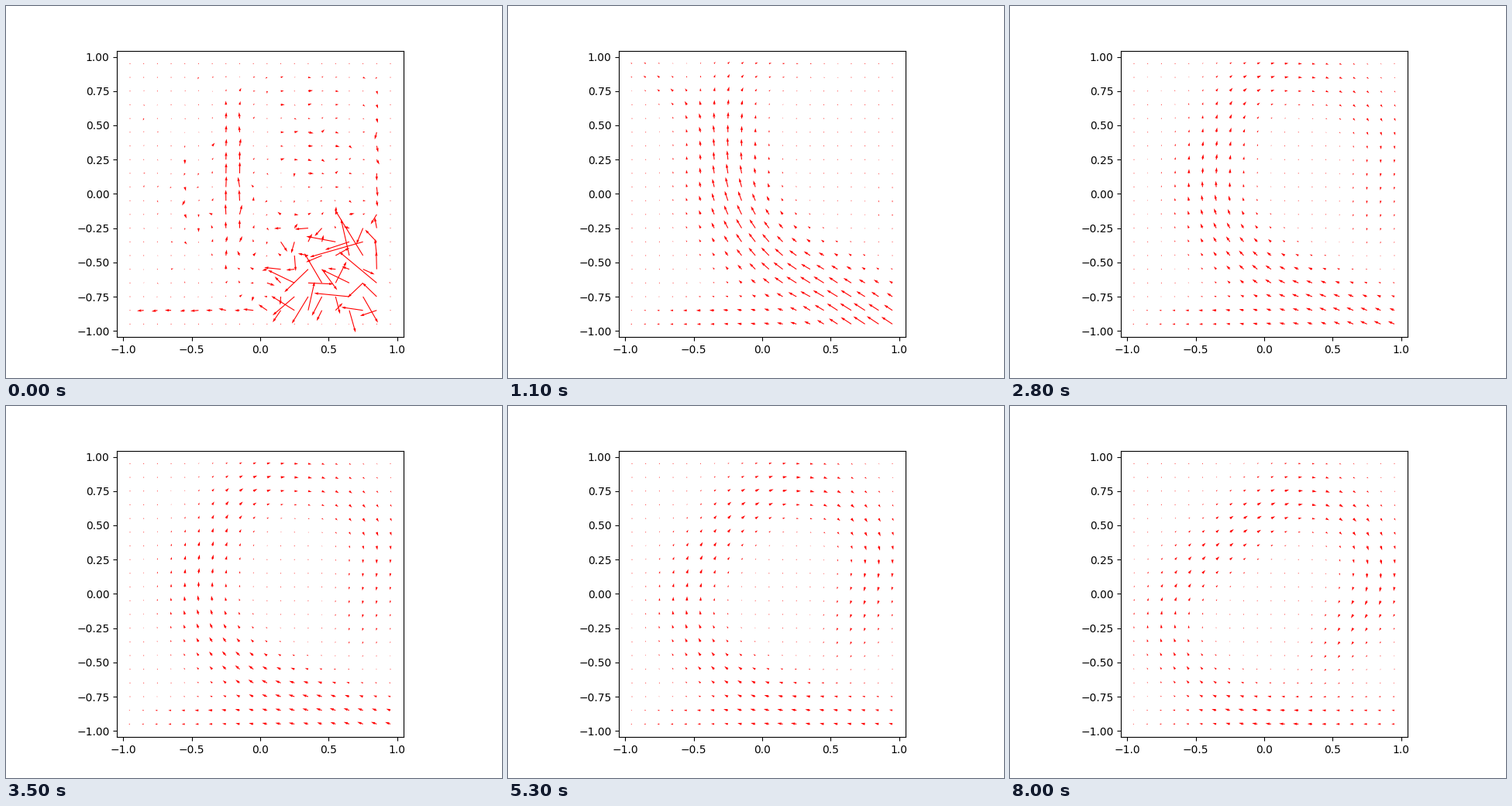
Recreate the animation shown at these times as a matplotlib script. Size 640 by 480 pixels, loop 8050 ms.

```python
import numpy as np
import matplotlib.pyplot as plt
from matplotlib.animation import FuncAnimation

FRAMES, STEP = 161, 50
SIDE = 369.6          # axes width in px, so arrow components are in px
FADE = 250            # ms, decay of the initial turbulence
SETTLED, END = 1100, 8000
SLOWING = 1700        # ms, time scale of the speed changes

axis = np.linspace(-0.95, 0.95, 20)
X, Y = np.meshgrid(axis, axis)

# The main stream as (x, y, speed): first an L-shaped jet, at last a ring
JET = np.array([
    (1, -1.08, 17), (.5, -.75, 18), (.1, -.52, 16), (-.15, -.2, 15),
    (-.25, .1, 14), (-.27, .45, 12.5), (-.22, .85, 5), (.1, .95, 3.5),
    (.5, .92, 1.5), (.9, .6, 0), (.92, -.2, 3)])
RING = np.array([
    (1, -.92, 3), (.4, -.9, 6), (-.1, -.88, 7.5), (-.5, -.66, 5.5),
    (-.75, -.2, 5.5), (-.52, .18, 6), (-.2, .47, 7), (.3, .76, 7),
    (.7, .52, 6), (.85, .1, 8.5), (.4, -.58, 3.5)])

# Side branches along the floor and towards the upper left
FLOOR = np.array([(.3, -.95, 10), (-.3, -.87, 8.5), (-.95, -.92, 1.5)])
UPPER = np.array([(-.35, .4, 9), (-.55, .68, 8), (-.9, .92, 3)])


def flow(*streams):
    """Blend the velocity around streams, each given as (points, width)."""
    num = np.zeros((2, 20, 20))
    den = np.full((20, 20), 1e-9)
    for points, width in streams:
        s = np.r_[0, np.cumsum(np.hypot(*np.diff(points[:, :2], axis=0).T))]
        along = np.linspace(0, s[-1], int(s[-1] / 0.05) + 3)
        x, y, speed = (np.interp(along, s, col) for col in points.T)
        tangent = np.array([np.gradient(x), np.gradient(y)])
        tangent /= np.hypot(*tangent)
        d2 = (X[..., None] - x) ** 2 + (Y[..., None] - y) ** 2
        g = (1 + d2 / width ** 2) ** -2
        num += ((g * g * speed) @ tangent.T).transpose(2, 0, 1)
        den += g.sum(axis=-1)
    return 1.6 * num / den


def settled(t):
    turn = max(0, (t - SETTLED) / (END - SETTLED)) ** 0.85
    slow = 1 - np.exp((SETTLED - t) / SLOWING)
    main = JET + (RING - JET) * (turn, turn, slow)
    main[:, 2] = main[:, 2].clip(0)
    upper = UPPER * (1, 1, min(1, 1 - slow))
    return flow((main, 0.38), (FLOOR, 0.2), (upper, 0.2 * np.exp(-turn)))


def bump(a, centre, width):
    return np.exp(-((a - centre) / width) ** 2)


def opening():
    rng = np.random.default_rng(4)
    odd = np.arange(20) % 2
    burst = np.exp(-((X - .57) / .44) ** 4 - ((Y + .58) / .36) ** 4)
    near = np.exp(-np.hypot(X - .5, Y + .5) / .5)
    u = 5 * (.3 + .7 * odd) * bump(X, .4, .42) * (Y > .1)
    u -= 8 * bump(Y, -.85, .06) * (X < .2)
    v = 16 * bump(X, -.2, .11) * bump(Y, .05, .6)
    v -= 7 * bump(X, -.53, .07) * bump(Y, 0, .4)
    v -= 9 * bump(X, .85, .06) * bump(Y, .3, .5)
    field = np.array([u, v])
    field += rng.normal(size=field.shape) * (0.7 + 5 * near + 22 * burst)
    field[0] -= 14 * burst
    # nearly still along the walls
    field[:, [0, -1]] *= 0.05
    field[:, :, [0, -1]] *= 0.05
    return field


turbulence = opening() - settled(0)


def velocity(t):
    return settled(t) + turbulence * np.exp(-t / FADE)


fig, ax = plt.subplots(figsize=(6.4, 4.8), dpi=100)
ax.set_aspect('equal')
ax.set(xlim=(-1.045, 1.045), ylim=(-1.045, 1.045))
arrows = ax.quiver(X, Y, *velocity(0), color='red', scale=SIDE,
                   scale_units='width', width=0.003)


def update(n):
    arrows.set_UVC(*velocity(n * STEP))
    return arrows,


anim = FuncAnimation(fig, update, frames=FRAMES, interval=STEP,
                     repeat=True, repeat_delay=0)
plt.show()
```
